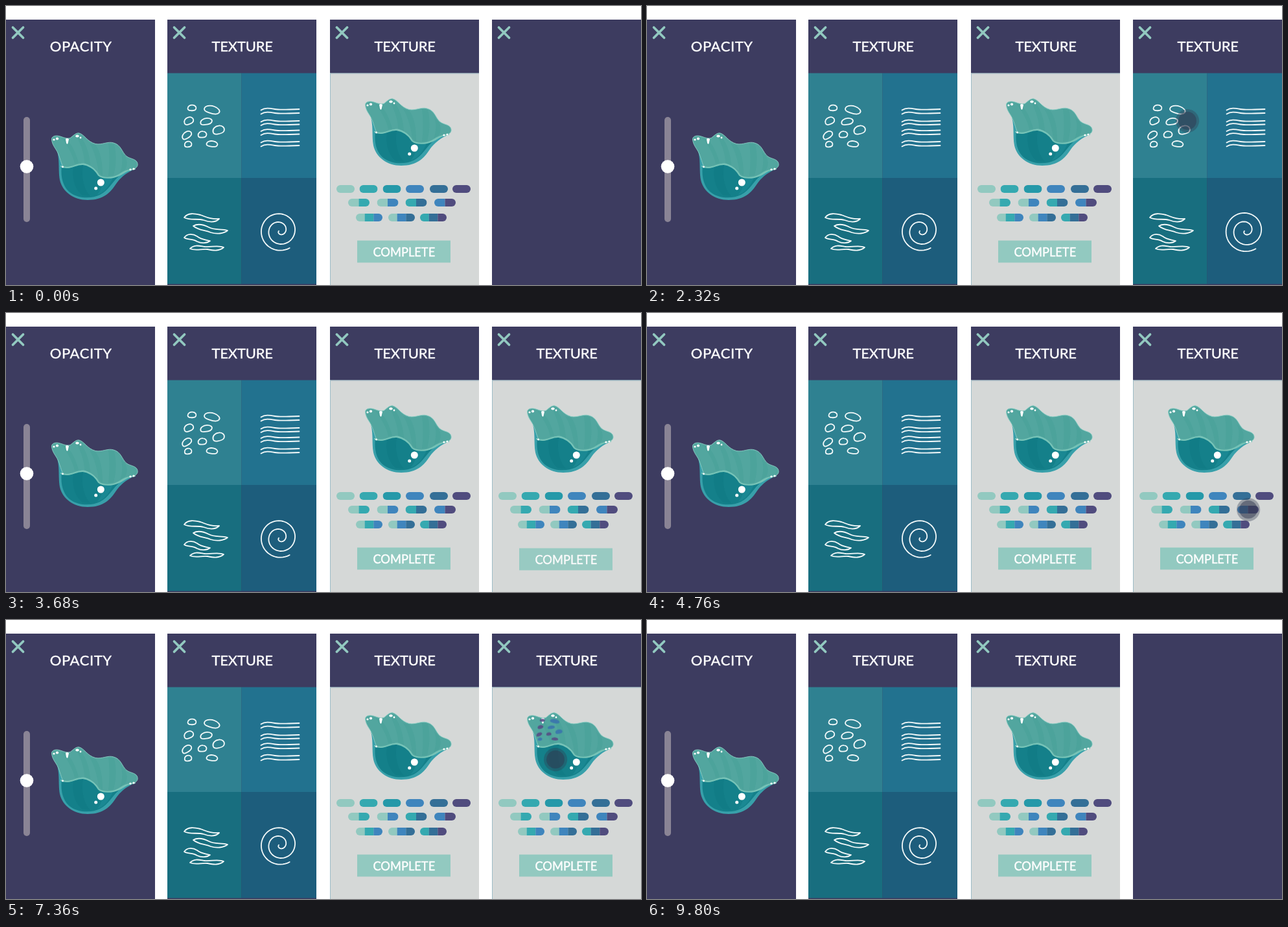
Animation of 980x430 px, one loop 9.84 s. Source, as an HTML page:

```html
<!DOCTYPE html>
<html lang="en">
<head>
<meta charset="utf-8">
<title>Texture picker</title>
<style>
html, body { margin: 0; width: 100%; height: 100%; overflow: hidden; background: #fff; }
svg { display: block; }
text { font-family: Lato, "Open Sans", sans-serif; fill: #fff; stroke: #fff; stroke-width: .4; text-anchor: middle; }
.title { font-size: 22px; }
.label { font-size: 18.3px; }
.ink { fill: none; stroke: #f4fafa; stroke-width: 1.8; stroke-linecap: round; stroke-linejoin: round; }
.ink path { vector-effect: non-scaling-stroke; }

.live .anim { animation: 9840ms linear infinite both; }
.live .scene { animation-name: leave; }
.live .heading { animation-name: heading; }
.live .tile { animation-name: tile; }
.live .paint { animation-name: paint; }
.live .row { animation-name: row; }
.live .button { animation-name: button; }
.live .dots1 { animation-name: dots1; }
.live .dots2 { animation-name: dots2; }
.live .tap { animation-name: tap; }

@keyframes leave { 0%, 93.3% { opacity: 1 } 97.8%, 100% { opacity: 0 } }
@keyframes heading { 0%, .8% { opacity: 0 } 5%, 100% { opacity: 1 } }
@keyframes tile {
  0%, 1.5% { opacity: 0 }
  6%, 36% { opacity: 1 }
  36.1%, 100% { opacity: 0 }
}
@keyframes paint { 0%, 26.8% { opacity: 0 } 30%, 100% { opacity: 1 } }
@keyframes row { 0%, 30.4% { opacity: 0 } 33%, 100% { opacity: 1 } }
@keyframes button {
  0%, 34.5% { opacity: 0; transform: translateY(10px); animation-timing-function: ease-out }
  38.4%, 100% { opacity: 1; transform: none }
}
@keyframes dots1 { 0%, 62.8% { opacity: 0 } 65.5%, 100% { opacity: .88 } }
@keyframes dots2 { 0%, 75.2% { opacity: 0 } 78%, 100% { opacity: .88 } }
@keyframes tap {
  0% { opacity: 0; transform: scale(1.4) }
  4.3% { opacity: .52; transform: scale(1.1) }
  6.5%, 9.5% { opacity: 1; transform: none }
  12.2%, 100% { opacity: 0; transform: scale(1.15) }
}
</style>
</head>
<body>
<svg id="stage" width="980" height="430" viewBox="0 0 980 430"></svg>
<script>
const NAVY = '#3d3c60', EDGE = '#9dbcc6';
const [MINT, TEAL, SEA, BLUE, STEEL, PLUM] =
  ['#92c9c0', '#35a9b0', '#2599a9', '#3f85bd', '#346f97', '#504c7e'];

const group = (body, at = '', cls = '', style = '') =>
  `<g class="${cls}" style="${style}"${at && ` transform="${at}"`}>${body}</g>`;
const move = (x, y) => `translate(${x} ${y})`;
const path = (d, attrs = '') => `<path d="${d}" ${attrs}/>`;
const rect = (x, y, w, h, fill, r = 0) =>
  `<rect x="${x}" y="${y}" width="${w}" height="${h}" rx="${r}" fill="${fill}"/>`;
const disc = (x, y, r, fill = '#fff') => `<circle cx="${x}" cy="${y}" r="${r}" fill="${fill}"/>`;
const text = (x, y, cls, s, gap = 0) =>
  `<text class="${cls}" x="${x}" y="${y}" letter-spacing="${gap}">${s}</text>`;

const back = rect(0, 21, 230, 409, NAVY);
const cross = path('M10.5 33L26.5 49M26.5 33L10.5 49',
  `stroke="${MINT}" stroke-width="3.8" stroke-linecap="round"`);
const title = (s, gap) => text(115.7, 70, 'title', s, gap);
const textureTitle = title('TEXTURE', -.2);

// Pebbles: centre, size, tilt
const pebbles = [
  [38, 157, 13, 9, 0], [69, 160, 24, 12, 14], [33, 177, 15, 11, -25],
  [60, 178, 18, 10, -10], [79, 191, 18, 13, -15], [30, 199, 16, 10, -35],
  [54, 198, 13, 10, -5], [32, 213, 11, 9, -10], [69, 212.5, 17, 9, 5]
];
const blob = 'M-.5 .1C-.5-.3-.2-.55 .1-.48C.4-.42 .55-.1 .48 .15C.42 .45 .1 .5-.15 .45C-.4 .42-.5 .3-.5 .1Z';
const pebbleSet = paint => pebbles.map(([x, y, w, h, a], i) =>
  path(blob, `transform="translate(${x} ${y}) rotate(${a}) scale(${w} ${h})" ${paint(i)}`)).join('');

const lines = [159, 165, 177, 182.5, 191.5, 197.5, 209, 215].map(y =>
  path(`M144.5 ${y + 1.5}C151 ${y - 2.5} 157 ${y - 1.5} 166 ${y}S182 ${y + .5} 203.5 ${y}`)).join('');

const waves = [
  'M26 326C32 318 42 320 51 322C60 325 66 329 80 328C74 334 64 333 56 330C46 327 36 331 26 326Z',
  'M40 339C47 335 56 337 64 341C73 346 82 343 93 346C87 351 76 352 67 349C57 345 48 346 40 339Z',
  'M26 357C31 350 40 351 46 355C52 360 58 360 66 362C61 366 52 366 46 363C39 358 32 361 26 357Z',
  'M35 374C42 367 50 370 58 371C68 372 78 368 87 372C80 378 72 377 62 375C52 374 44 378 35 374Z'
].map(d => path(d)).join('');

function swirl(scale) {
  let d = '';
  for (let i = 0; i <= 120; i++) {
    const u = i / 120, a = 1.05 + u * 2.3 * 2 * Math.PI;
    const r = 29 * scale * (1 - u ** 1.4) + 1.5;
    d += `${i ? 'L' : 'M'}${(173.5 + r * Math.cos(a)).toFixed(1)} ${(346.5 + r * Math.sin(a)).toFixed(1)}`;
  }
  return path(d);
}

const tiles = scale => [
  [0, 103.5, '#2f8191', pebbleSet(() => '')], [114.5, 103.5, '#22728f', lines],
  [0, 265, '#186e7f', waves], [114.5, 265, '#1d5d7c', swirl(scale)]
].map(([x, y, fill, icon], i) =>
  group(rect(x, y, x ? 115.5 : 114.5, y > 200 ? 163.5 : 161.5, fill) + group(icon, '', 'ink'),
    '', 'anim tile', `animation-delay:${i * 220}ms`)).join('');

const petal = 'M70.5 206C70 201 76 199 82 200.5C88 202 93 205 99 203.5C104 200 108 195 113 196'
  + 'C121 198 125 209 138 212.5C149 214.5 157 208 166 211C178 214 179 226 186 231.5C192 236 199 235 202.5 241'
  + 'C205 248 200 251 192 252C184 255 178 262 166 264C156 265 147 265 143 261C140 253 132 246 120 243'
  + 'C108 243 101 252 88 248C84 240 83 230 77 221C73 215 71 211 70.5 206Z';
const lip = 'M85 247C98 253 107 243 119 244C132 246 139 254 143 261C149 266 164 266 173 261C180 257 185 253 199 251';
const folds = 'M86 204C97 218 104 232 106 243L112 242C108 226 101 212 93 206Z'
  + 'M109 201C117 216 121 231 121 241L130 246C129 226 123 211 114 200Z'
  + 'M129 212C137 224 141 242 143 257L149 262C149 240 146 224 138 214Z'
  + 'M158 212C160 226 160 246 158 262L166 261C171 243 170 225 167 213Z'
  + 'M176 224C181 232 180 247 176 257L184 252C188 245 187 238 184 232Z';

const flower =
  path('M77 218C84 236 80 252 83 268C87 286 104 299 126 299C150 299 161 288 170 274C177 264 187 256 200 251L150 246L90 240Z', 'fill="#38a0aa"')
  + path('M86 246C84 262 87 280 101 289C113 297 133 297 145 291C158 285 164 270 178 259L140 255L119 243Z', 'fill="#14808a"')
  + path('M104 249C101 268 108 285 118 292L130 293C119 281 116 262 119 245Z', 'fill="#0e737f" opacity=".35"')
  + path('M149 264C150 276 146 286 140 291C153 288 160 276 165 265Z', 'fill="#2494a0" opacity=".4"')
  + path(petal, 'fill="#52a69f" stroke="#8ccfc4" stroke-width=".9"')
  + path(folds, 'fill="#3b978f" opacity=".25"')
  + path(lip, 'fill="none" stroke="#76c3b6" stroke-width="2.2" stroke-linecap="round"')
  + path('M92 205Q94 203 97 205L95.5 212Q94 214 93 211Z', 'fill="#fff"')
  + disc(74, 206, 1.6) + disc(79, 204.5, 2.1) + disc(87.5, 248, 1.4)
  + `<ellipse cx="110" cy="200.5" rx="2.7" ry="2" fill="#fff"/>`
  + disc(115, 203, 1.4) + disc(192, 252, 1.6) + disc(197, 251, 1.6)
  + disc(146.3, 272, 5.5) + disc(138.7, 281, 2.5);

let clips = 0;
function pill(x, y, w, h, colors) {
  const id = `pill${clips++}`, step = w / colors.length;
  const bands = colors.map((c, i) => rect(x + i * step, y, step + .1, h, c)).join('');
  return `<clipPath id="${id}">${rect(x, y, w, h, '#000', h / 2)}</clipPath><g clip-path="url(#${id})">${bands}</g>`;
}
const swatchRows = [
  [276, 28, [10, 45.5, 81.5, 117, 154, 189], [[MINT], [TEAL], [SEA], [BLUE], [STEEL], [PLUM]]],
  [297, 33, [28, 72.5, 116.5, 161], [[MINT, TEAL], [MINT, BLUE], [TEAL, STEEL], [BLUE, PLUM]]],
  [320, 41, [40, 90, 139], [[MINT, TEAL, BLUE], [MINT, BLUE, STEEL], [TEAL, STEEL, PLUM]]]
];
const swatches = () => swatchRows.map(([y, w, xs, sets], i) =>
  group(xs.map((x, j) => pill(x, y, w, 12, sets[j])).join(''),
    '', 'anim row', `animation-delay:${i * 110}ms`)).join('');

const dotPaint = i => `fill="${i % 3 === 1 || i === 3 ? '#3a73ae' : '#574b84'}"`;
const dots = (n, x, y, sx, sy) => group(
  group(pebbleSet(dotPaint), `translate(${x} ${y}) scale(${sx} ${sy}) translate(-56 -185)`),
  '', `anim dots${n}`);

const paintView = extra => rect(0, 103.5, 230, 326.5, '#d5d8d7')
  + rect(0, 103.5, 230, 1, EDGE) + rect(0, 103.5, 1, 326.5, EDGE)
  + group(flower, move(-16, -53)) + extra + swatches()
  + group(rect(42, 361.5, 144, 34, MINT) + text(114.3, 385.5, 'label', 'COMPLETE'), '', 'anim button');

const taps = [
  [84, 177, 1400], [178, 303, 4020], [86, 168, 5440], [98, 215, 6480], [114, 377, 7960]
].map(([x, y, start]) => group(
  group(disc(0, 0, 18, 'rgba(52,58,82,.36)') + disc(0, 0, 14, 'rgba(48,56,80,.5)'),
    '', 'anim tap', `animation-delay:${start}ms`), move(x, y))).join('');

const opacityPanel = back + cross + title('OPACITY', .6)
  + rect(27, 171, 10, 162, '#8a8495', 5) + disc(32, 247.5, 10.3) + flower;
const texturePanel = back + cross + textureTitle + tiles(1);
const paintPanel = back + cross + textureTitle + paintView('');
const livePanel = back + group(
  cross + group(textureTitle, '', 'anim heading') + tiles(1.05)
  + group(paintView(dots(1, 89, 169, .62, .52) + dots(2, 98, 217, .66, .54)), '', 'anim paint')
  + taps, '', 'anim scene');

document.getElementById('stage').innerHTML =
  group(opacityPanel)
  + group(texturePanel, move(249, 0))
  + group(paintPanel, move(500, 0))
  + group(livePanel, move(750, 0), 'live');
</script>
</body>
</html>
```
